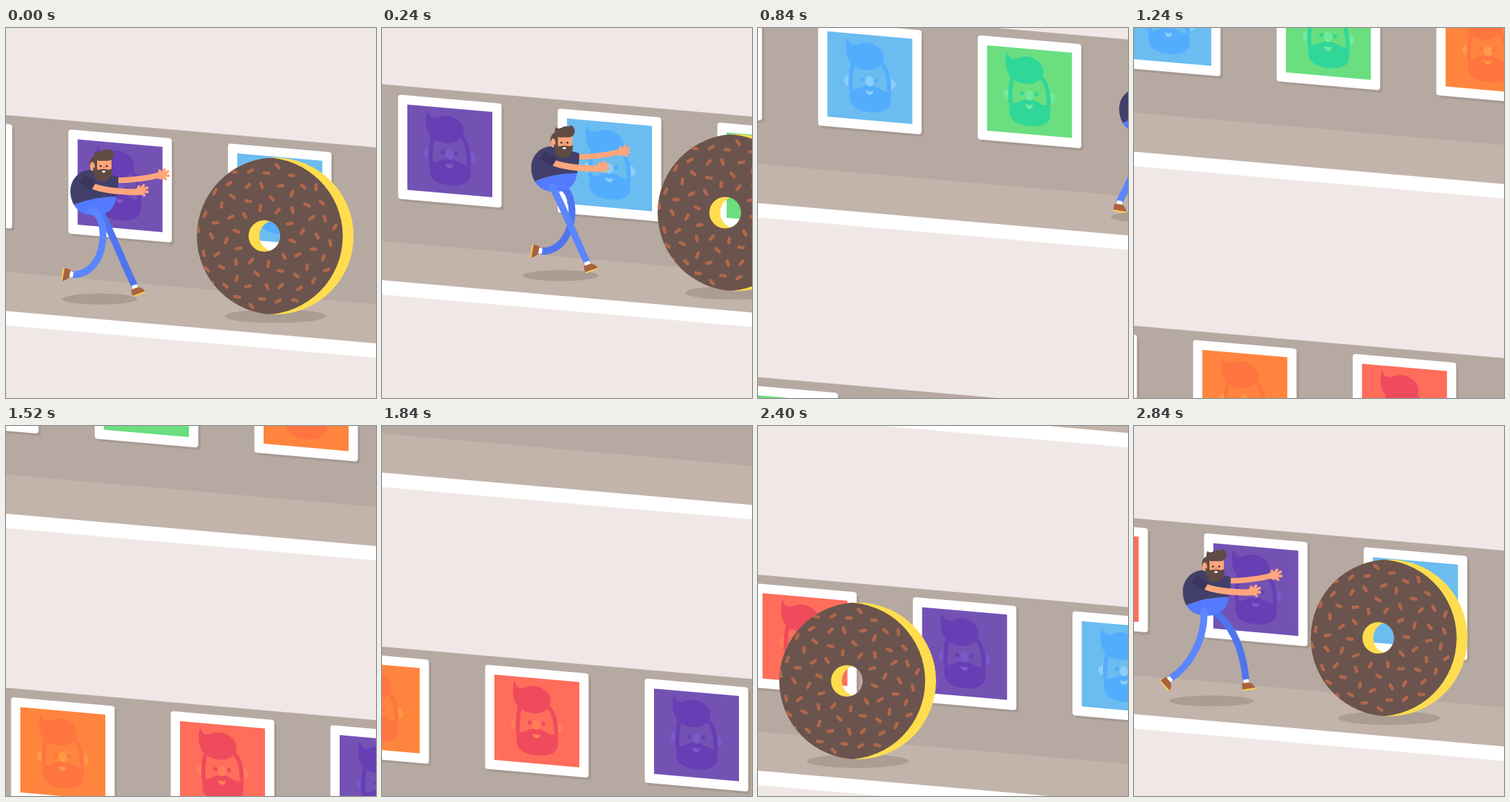
Recreate the animation shown at these times as an HTML page with a canvas. Size 540 px wide and 540 px high, loop 2880 ms.

```html
<!DOCTYPE html>
<html lang="en">
<head>
<meta charset="utf-8">
<title>Doughnut chase</title>
<style>
  html, body { margin: 0; height: 100%; overflow: hidden; background: #f0e8e6; }
  canvas { display: block; width: 540px; height: 540px; }
</style>
</head>
<body>
<canvas width="540" height="540"></canvas>
<script>
const ctx = document.querySelector('canvas').getContext('2d');
const TAU = Math.PI * 2, RAD = Math.PI / 180;
const STEP = 40, STEPS = 72, SLOPE = 0.0873;
const RUN = 20.625;                    // screen speed of the runners per step
const CAMERA = { x: 11.25, y: 7.5 };   // camera travel per step, in gallery space

// background, hair and highlight tones of the portraits
const PORTRAITS = [
  ['#7352b4', '#663fb4', '#7c59c8'],
  ['#6bbcf0', '#53adff', '#8bcffa'],
  ['#6bde80', '#30d798', '#70eb9b'],
  ['#ff853e', '#ff7540', '#ff9a45'],
  ['#ff6d5b', '#ef4b5c', '#ff7f58']
];
const HAIR = new Path2D('M43 20C45 29 50 31 57 29C68 23 78 24 86 29C94 34 98 42 95 50C91 60 81 65 70 65C55 65 45 57 42 46C40 37 40 28 43 20Z');
const SIDES = new Path2D('M52 55Q47 66 47.500 94M88 50Q104 60 103.500 92');
const BEARD = new Path2D('M46 91C56 101 62 85 75 88C88 85 95 101 106 90V106C106 120 94 126 76 126C58 126 46 120 46 106Z');
const SMILE = new Path2D('M69.500 94.500Q75 97 80.500 94.500Q80 101 75 101Q70 101 69.500 94.500Z');
const EARS = new Path2D('M46 75C35 74 35 91 46 90ZM105 75C116 74 116 91 105 90Z');

const SHIRT = new Path2D('M99 258C92 245 92 228 101 218C108 209 119 206 128 207L164 217L164 227L161 246Q128 246 99 258Z');
const PANTS = new Path2D('M99 258C106 271 122 275 135 273C151 271 160 261 161 245Q128 246 99 258Z');
const NAPE = new Path2D('M122 202C121 190 127 185 134 187L135 207L127 208Z');
const FACE_BEARD = new Path2D('M127 203C131 209 136 206 142 206C147 206 151 208 154.500 205C156 216 150 224 141 224C132 224 127 217 127 203Z');
const QUIFF = new Path2D('M130 179C133 182 136 181 140 179C145 176 149 180 152 176C158 179 159 186 156 190C152 196 144 193 138 194C130 194 126 187 130 179Z');
const SHOE = new Path2D('M-6 5H5Q11 9 12 15H-7Q-8 9 -6 5Z');

// radius, bearing and tilt of sprinkles, each repeated ten times around
const SPRINKLES = [
  [103.800, -79.400, 50], [92, -88, 5], [97, -102, -30], [74, -93, 72],
  [77, -72, -12], [56, -78.700, 45], [41.300, -98, 96]
];

// run cycle: phase, two curve handles, ankle, shoe angle
const STRIDE = [
  [-1, 148, 280, 166, 310, 172, 364, -8],
  [0, 143, 300, 158, 340, 175, 375, -20],
  [1, 158, 300, 162, 340, 155, 374, 8],
  [3, 130, 300, 112, 340, 95, 372, 10],
  [5, 124, 310, 100, 345, 75, 362, 48],
  [6, 152, 275, 148, 360, 98, 360, 100],
  [7, 164, 268, 168, 335, 127, 353, 75],
  [9, 168, 270, 172, 320, 150, 350, 35],
  [11, 148, 280, 166, 310, 172, 364, -8]
];

function fill(color, path, rule) { ctx.fillStyle = color; ctx.fill(path, rule || 'nonzero'); }
function stroke(color, width, path, cap = 'butt') {
  ctx.strokeStyle = color; ctx.lineWidth = width; ctx.lineCap = cap;
  ctx.stroke(path);
}
function ellipse(color, x, y, rx, ry = rx) {
  ctx.beginPath();
  ctx.ellipse(x, y, rx, ry, 0, 0, TAU);
  ctx.fillStyle = color;
  ctx.fill();
}
function rect(color, x, y, w, h, r = 0) {
  ctx.beginPath();
  ctx.roundRect(x, y, w, h, r);
  ctx.fillStyle = color;
  ctx.fill();
}
function at(x, y, angle, draw) {
  ctx.save();
  ctx.translate(x, y);
  ctx.rotate(angle * RAD);
  draw();
  ctx.restore();
}

function portrait([ground, dark, light]) {
  rect('#a79a92', 3.5, 3.5, 151, 152, 4);
  rect('#fff', 0, 0, 151, 152, 4);
  rect(ground, 13.5, 13.5, 124, 124.5);
  fill(light, EARS);
  stroke(dark, 6, SIDES);
  fill(dark, HAIR);
  fill(dark, BEARD);
  ellipse(dark, 65, 79, 3);
  ellipse(dark, 85, 79, 3);
  ellipse(light, 75, 81, 6, 7.5);
  fill(light, SMILE);
}

function gallery(x, y) {
  ctx.save();
  ctx.transform(1, SLOPE, 0, 1, 0, 0);
  rect('#b6a9a2', 0, y + 127, 540, 229.5);
  rect('#c2b3ab', 0, y + 356, 540, 57.5);
  rect('#fff', 0, y + 413, 540, 21);
  for (let i = -5; i < 7; i++) {
    at(x + 91 + 233 * i, y + 140, 0, () => portrait(PORTRAITS[(i + 5) % 5]));
  }
  ctx.restore();
}

function doughnut(step) {
  const R = 114.5, r = 23, edge = 16;
  const x = 393 + RUN * step;
  const y = 269.3 - CAMERA.y * step + SLOPE * x;
  ellipse('#ab9c94', x, y + 117, 74, 10);
  at(x, y, 0, () => {
    const half = Math.acos(edge / 2 / r);
    const body = new Path2D();
    body.arc(0, 0, R, 0, TAU);
    body.moveTo(-edge + r * Math.cos(half), -r * Math.sin(half));
    body.arc(-edge, 0, r, -half, half);
    body.arc(0, 0, r, Math.PI - half, Math.PI + half);
    body.closePath();
    ctx.clip(body, 'evenodd');
    fill('#ffdd4f', body, 'evenodd');

    const icing = new Path2D();
    icing.arc(-edge, 0, R, 0, TAU);
    icing.moveTo(-edge + r, 0);
    icing.arc(-edge, 0, r, 0, TAU);
    fill('#6b544d', icing, 'evenodd');

    at(-edge, 0, 12 * step, () => {
      for (let k = 0; k < 10; k++) {
        for (const [radius, bearing, tilt] of SPRINKLES) {
          const a = (bearing + 36 * k) * RAD;
          at(radius * Math.cos(a), radius * Math.sin(a), tilt + 36 * k,
            () => rect('#b0674c', -5.7, -2.4, 11.4, 4.8, 2.4));
        }
      }
    });
  });
}

function stride(phase) {
  const p = ((phase + 1) % 12 + 12) % 12 - 1;
  const i = STRIDE.findIndex(key => key[0] > p);
  const a = STRIDE[i - 1], b = STRIDE[i];
  const k = (p - a[0]) / (b[0] - a[0]);
  return a.slice(1).map((v, j) => v + (b[j + 1] - v) * k);
}

function leg(phase, bob, color) {
  const [x1, y1, x2, y2, x, y, angle] = stride(phase);
  const line = new Path2D();
  line.moveTo(125 + bob, 266 + bob);
  line.bezierCurveTo(x1, y1, x2, y2, x, y);
  stroke(color, 10, line, 'round');
  at(x, y, angle, () => {
    rect('#fff', -4, 0, 8, 6);
    fill('#a9623f', SHOE);
    rect('#ffcf4f', -7.5, 14, 19.5, 2, 1);
  });
}

function hand(x, y, turn) {
  const skin = '#ffa67c';
  at(x, y, turn, () => {
    ellipse(skin, 0, 0, 6.5, 6);
    for (const [angle, length] of [[-105, 9], [-58, 12], [-28, 14], [2, 13.5], [38, 11]]) {
      at(0, 0, angle, () => rect(skin, 0, -2, length, 4, 2));
    }
  });
}

function head() {
  const hair = '#5f4b44', skin = '#ffa67c';
  fill(hair, NAPE);
  ellipse(skin, 126, 202, 3.5, 6.5);
  rect(skin, 133, 190, 21, 19, 3);
  fill(hair, FACE_BEARD);
  fill(hair, QUIFF);
  ellipse('#43332f', 138, 201.5, 1.5);
  ellipse('#43332f', 147, 201.5, 1.5);
  ellipse('#f58a62', 143, 204, 2, 2.6);
  ellipse('#fff', 142.5, 209.5, 2.6, 1.5);
}

function man(step) {
  const swing = Math.cos((step - 1.5) * Math.PI / 3), bob = 2.5 * swing;
  at(RUN * step, (SLOPE * RUN - CAMERA.y) * step, 0, () => {
    ellipse('#ab9c94', 137 + 4 * swing, 395.5, 55 - 7.5 * swing, 8);
    at(12, 0, 0, () => leg(step, bob, '#4f75ee'));
    at(bob, bob, 0, () => {
      stroke('#ffa67c', 8, new Path2D('M160 222.500Q195 222 223 215'));
      hand(226, 215, 0);
      fill('#537aff', PANTS);
      fill('#42406a', SHIRT);
    });
    leg(step + 6, bob, '#5b86ff');
    at(bob, bob, 0, () => {
      head();
      stroke('#ffa67c', 9, new Path2D('M125 230Q145 239 192 239.500'));
      stroke('#3a365f', 14, new Path2D('M110 220L128 231'));
      hand(195, 238, 4);
    });
  });
}

function render(now) {
  const step = Math.floor(now / STEP) % STEPS;
  const x = -CAMERA.x * step, y = -CAMERA.y * step;
  const actorStep = step > STEPS / 2 ? step - STEPS : step;
  rect('#f0e8e6', 0, 0, 540, 540);
  gallery(x, y);
  gallery(x + CAMERA.x * STEPS, y + CAMERA.y * STEPS);
  doughnut(actorStep);
  man(actorStep);
}

const start = performance.now();
function tick() {
  render(performance.now() - start);
  requestAnimationFrame(tick);
}
tick();
</script>
</body>
</html>
```
